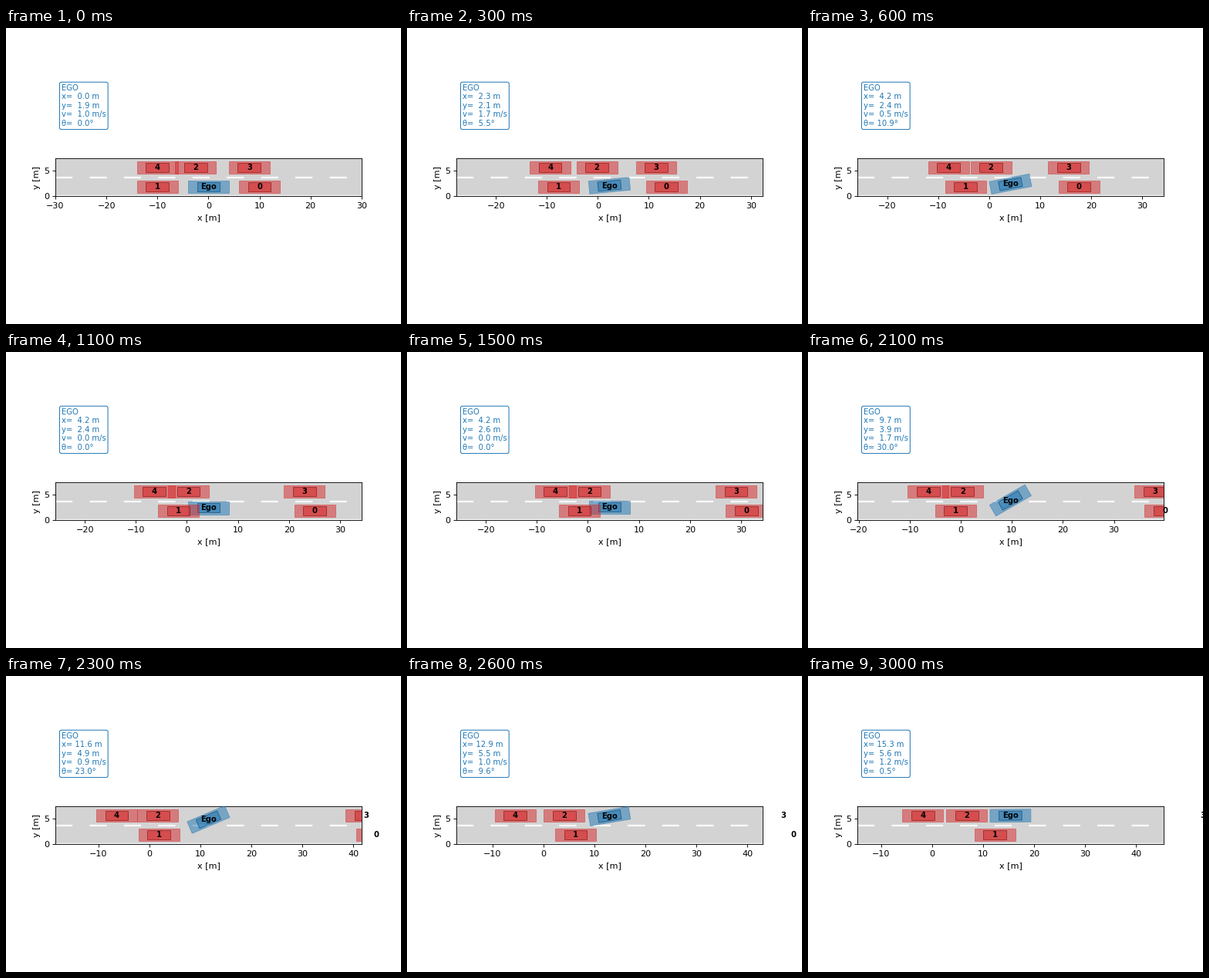
A matplotlib script for the animation above (3100 ms loop, 512 by 384 pixels).

```python
import matplotlib.pyplot as plt
from matplotlib.animation import FuncAnimation
from matplotlib.patches import Rectangle
from matplotlib.ticker import MultipleLocator

W, H, DPI = 512, 384, 80
FRAMES, INTERVAL = 31, 100
ROAD, VIEW = 7.4, 30
NEAR, FAR = 1.875, 5.625
DT = 0.5
CRUISE = 1.496
LAST = 31
BLUE, RED = (0.122, 0.467, 0.706), (0.839, 0.153, 0.157)

plt.rcParams["font.family"] = "DejaVu Sans"


def leg(n, start, end, dist=1, v0=0, v1=0):
    """Distance covered at step n by a smooth move with entry and exit speeds."""
    d = end - start
    t = min(max((n - start) / d, 0), 1)
    a, b = v0 * d, v1 * d
    return t * (a + t * (3 * dist - 2 * a - b + t * (a + b - 2 * dist)))


def ego_x(n):
    return (leg(n, 0, 6.6, 4.23, v0=.5) + leg(n, 15, 21, 5.48, v1=.85)
            + leg(n, 21, 27, 3.21, .85, .5) + leg(n, 27, LAST, 2.42, .5, .6))


def ego_y(n):
    """A first nudge, a creep at standstill, then the lane change."""
    return (NEAR + .565 * leg(n, 0, 7) + .12 * leg(n, 13, 15)
            + 3.06 * leg(n, 14.5, 28.6))


def ego_angle(n):
    nudge = 10.9 * leg(n, 0, 6) * (1 - leg(n, 6, 9))
    merge = leg(n, 15, 21) * (30 - 29.5 * leg(n, 21, 30.5))
    return nudge + merge


def ego_speed(n, h=1e-3):
    n = min(max(n, h), LAST - h)
    return (ego_x(n + h) - ego_x(n - h)) / (2 * h * DT)


def leader(start, n):
    """A free car that speeds up over six steps, then cruises."""
    return start + CRUISE * n - 1.4 * (1 - (1 - min(n / 6, 1)) ** 2)


def follower_1(n):
    return (-10 + leg(n, 0, 11, 8.35, v0=.5) + leg(n, 19, 25, 4.95, v1=1.5)
            + 1.5 * max(n - 25, 0))


def follower_2(n):
    return (-2.5 + leg(n, 0, 5, 2.83, v0=1) + leg(n, 21, 27, 3.74, v1=.75)
            + .675 * max(n - 27, 0))


def follower_4(n):
    return -10 + leg(n, 0, 11, 3.6) + leg(n, 24, LAST, 4.55, v1=1.3)


class Car:
    def __init__(self, ax, name, color, z):
        dark = tuple(0.7 * c for c in color)
        self.parts = [
            self.box(ax, 8, 2.5, z, facecolor=color + (.5,), edgecolor=color + (.5,), lw=.8),
            self.box(ax, 4.5, 1.8, z, facecolor=color + (.55,), edgecolor=dark + (.8,), lw=.8),
        ]
        self.label = ax.text(0, 0, name, fontsize=9, fontweight="bold",
                             ha="center", va="center", zorder=6)

    @staticmethod
    def box(ax, w, h, z, **style):
        return ax.add_patch(Rectangle((0, 0), w, h, rotation_point="center",
                                      zorder=z, **style))

    def move(self, x, y, angle=0):
        for p in self.parts:
            p.set_xy((x - p.get_width() / 2, y - p.get_height() / 2))
            p.set_angle(angle)
        self.label.set_position((x, y))


fig, ax = plt.subplots(figsize=(W / DPI, H / DPI), dpi=DPI)
ax.set_aspect("equal")
ax.set_facecolor("lightgray")
ax.set_xlim(-VIEW, VIEW)
ax.set_ylim(0, ROAD)
ax.set_xlabel("x [m]", x=.5025)
ax.set_ylabel("y [m]")
ax.xaxis.set_major_locator(MultipleLocator(10))
ax.yaxis.set_major_locator(MultipleLocator(5))
for edge in (0, ROAD):
    ax.axhline(edge, color="white", lw=2)
ax.axhline(ROAD / 2, color="white", lw=2, linestyle=(0, (10, 10)))

ego = Car(ax, "Ego", BLUE, 3)
cars = [Car(ax, str(k), RED, 4) for k in range(5)]
info = fig.text(71.94 / W, 1 - 72.7 / H, "", fontsize=9, color=BLUE, va="top",
                bbox=dict(boxstyle="round,pad=0.25", facecolor="white",
                          edgecolor=BLUE, lw=.9))


def update(i):
    n = i + (i >= 23)
    x, y, angle, v = (f(n) for f in (ego_x, ego_y, ego_angle, ego_speed))
    ego.move(x, y, angle)
    cars[0].move(leader(10, n), NEAR)
    cars[1].move(follower_1(n), NEAR)
    cars[2].move(follower_2(n), FAR)
    cars[3].move(leader(8, n), FAR)
    cars[4].move(follower_4(n), FAR)

    ax.set_xlim(x - VIEW, x + VIEW)
    info.set_text(f"EGO\nx={x:5.1f} m\ny={y:5.1f} m\n"
                  f"v={abs(v):5.1f} m/s\nθ={angle:5.1f}°")
    return []


anim = FuncAnimation(fig, update, frames=FRAMES, interval=INTERVAL,
                     repeat=True, repeat_delay=0, blit=False)
plt.show()
```
